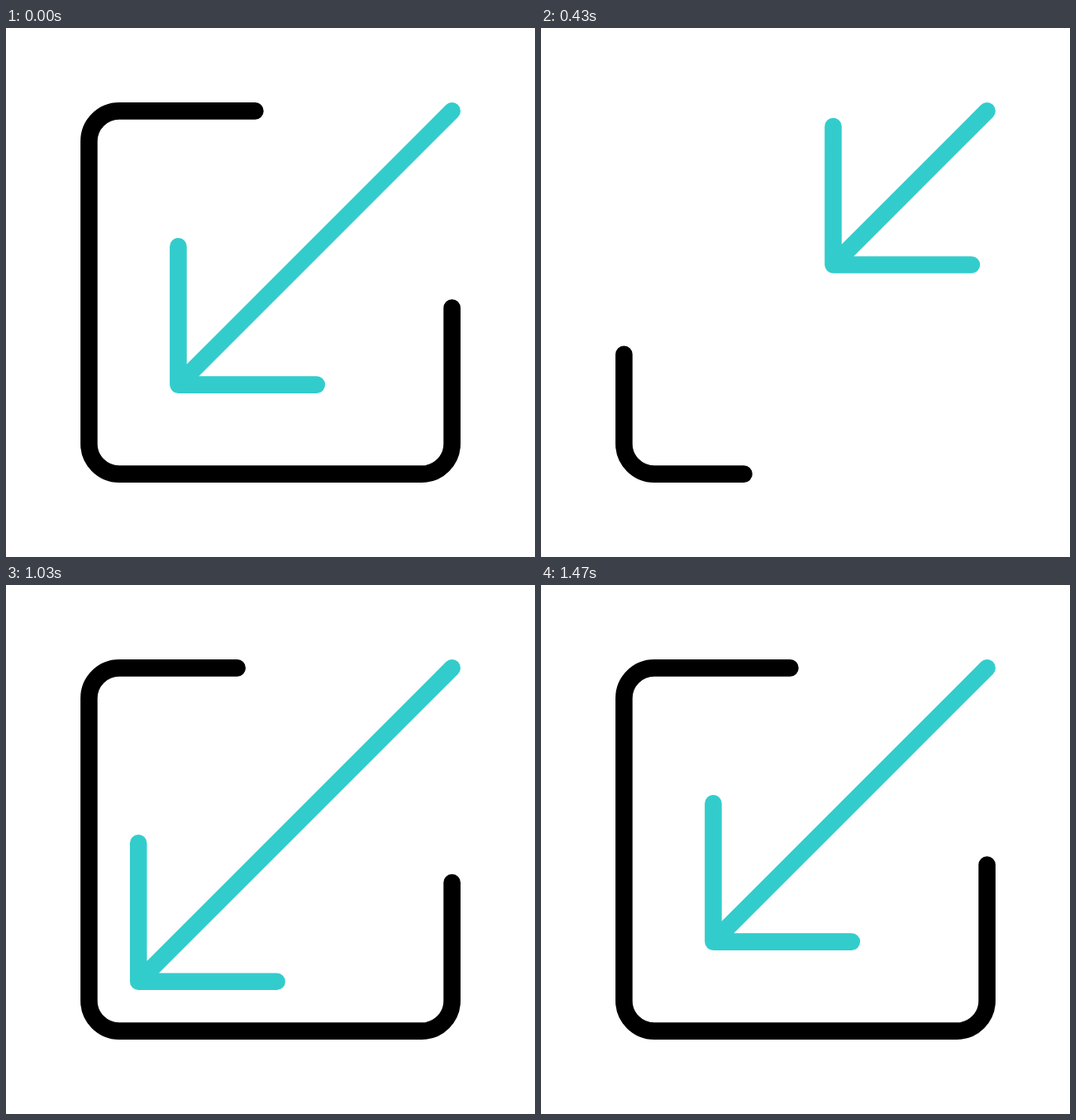
These frames come from a looping animation (640 px wide and 640 px high, 2000 ms). An HTML page:

```html
<!DOCTYPE html>
<html lang="en">
<head>
<meta charset="utf-8">
<title>Arrow into box</title>
<style>
  html, body { margin: 0; height: 100%; overflow: hidden; background: #fff; }
  svg { display: block; width: 100%; height: 100%; }
  path { fill: none; stroke-width: 20.6; stroke-linecap: round; stroke-linejoin: round; }
</style>
</head>
<body>
<svg viewBox="0 0 640 640">
  <path id="box" stroke="#000" d="M301.4 100.4H137A36.6 36.6 0 0 0 100.4 137V503A36.6 36.6 0 0 0 137 539.6H503A36.6 36.6 0 0 0 539.6 503V338.6"/>
  <path id="arrow" stroke="#33cccc"/>
</svg>
<script>
const LOOP = 2000;
const STEPS_PER_MS = 0.03;
const SETTLED = 44;

const box = document.getElementById('box');
const arrow = document.getElementById('arrow');
const boxLength = box.getTotalLength();

const swing = u => 0.3 * u + 0.7 * u * u * (3 - 2 * u);
const easeOut = power => u => 1 - (1 - u) ** power;

// Runs from rest to a peak, springs back past a low and a rebound, then rests
function spring(peak, low, rebound, release) {
  const legs = [[...peak, swing], [...low, release], [...rebound, swing], [SETTLED, 0, swing]];
  return step => {
    let from = 0, value = 0;
    for (const [to, target, ease] of legs) {
      if (step < to) return value + (target - value) * ease((step - from) / (to - from));
      from = to;
      value = target;
    }
    return value;
  };
}

const pull = spring([17.1, 175.5], [31, -48.2], [36, 21.3], easeOut(1.36));
const trim = spring([14.3, 501.5], [30, 18.5], [36, 50.2], easeOut(2.35));

function draw(time) {
  const step = Math.floor((time % LOOP) * STEPS_PER_MS + 0.15);

  const cut = trim(step);
  box.setAttribute('stroke-dasharray', `${boxLength - 2 * cut} ${boxLength}`);
  box.setAttribute('stroke-dashoffset', -cut);

  const x = 208.4 + pull(step);
  const y = 640 - x;
  arrow.setAttribute('d', `M${x} ${y - 167.4}V${y}H${x + 167.4}M${x} ${y}L539.6 100.4`);
}

const start = performance.now();
function tick() {
  draw(performance.now() - start);
  requestAnimationFrame(tick);
}
tick();
</script>
</body>
</html>
```
